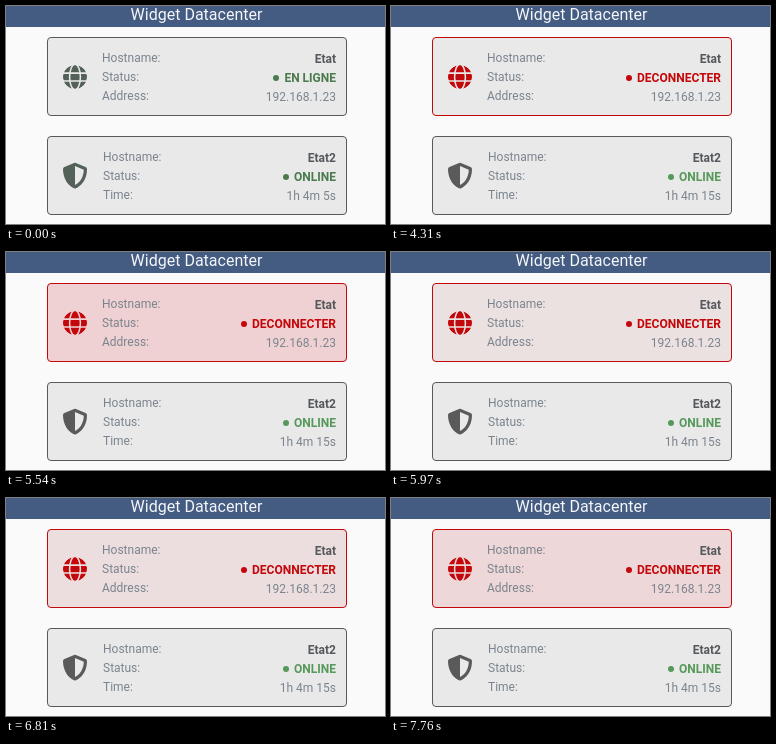
These frames come from a looping animation (379 by 218 pixels, 7.83 s). An HTML page:

```html
<!DOCTYPE html>
<html lang="en">
<head>
<meta charset="utf-8">
<title>Widget Datacenter</title>
<style>
html, body { margin: 0; width: 100%; height: 100%; overflow: hidden; background: #fafafa; }
svg { display: block; width: 379px; height: 218px; font: 12px Roboto, sans-serif; }
.title { font-size: 16px; fill: #f4f6f8; text-anchor: middle; }
.label, .value { fill: #7b848e; }
.right { text-anchor: end; }
.name { fill: #55585c; font-weight: 700; }
.state { font-weight: 700; }
</style>
</head>
<body>
<svg viewBox="0 0 379 218">
  <defs>
    <mask id="grid" maskUnits="userSpaceOnUse" x="-13" y="-13" width="26" height="26">
      <circle r="12" fill="#fff"/>
      <g fill="none" stroke="#000" stroke-width="1.55">
        <ellipse rx="5.4" ry="12.8"/>
        <path d="M-13 -3.9H13M-13 3.9H13"/>
      </g>
    </mask>
  </defs>
  <rect width="379" height="218" fill="#fafafa"/>
  <rect width="379" height="21" fill="#445b82"/>
  <text class="title" x="190.5" y="14">Widget Datacenter</text>

  <g id="server">
    <rect class="box" x="41.5" y="31.5" width="299" height="78" rx="3.5" fill="#e9e9e9"/>
    <g class="icon" transform="translate(69 71)"><circle r="12" mask="url(#grid)"/></g>
    <text class="label" x="96" y="56">Hostname:</text>
    <text class="label" x="96" y="75">Status:</text>
    <text class="label" x="96" y="94">Address:</text>
    <text class="right name" x="330" y="57">Etat</text>
    <circle class="state dot" cy="72" r="3"/>
    <text class="right state word" x="330" y="76"></text>
    <text class="right value" x="330" y="95">192.168.1.23</text>
  </g>

  <g id="uptime">
    <rect class="box" x="41.5" y="130.5" width="299" height="78" rx="3.5" fill="#e9e9e9"/>
    <g class="icon" transform="translate(56.2 156.8) scale(.05)">
      <path d="M466.5 83.7l-192-80a48.15 48.15 0 0 0-36.9 0l-192 80C27.7 91.1 16 108.6 16 128c0 198.5 114.5 335.7 221.5 380.3 11.8 4.9 25.1 4.9 36.9 0C360.1 472.6 496 349.3 496 128c0-19.4-11.7-36.9-29.5-44.3zM256.1 446.3l-.1-381 175.9 73.3c-3.3 151.4-82.1 261.1-175.8 307.7z"/>
    </g>
    <text class="label" x="97" y="155">Hostname:</text>
    <text class="label" x="97" y="174">Status:</text>
    <text class="label" x="97" y="193">Time:</text>
    <text class="right name" x="330" y="156">Etat2</text>
    <circle class="state dot" cx="280" cy="171" r="3"/>
    <text class="right state" x="330" y="175">ONLINE</text>
    <text class="right value" id="clock" x="330" y="194"></text>
  </g>
</svg>
<script>
const LOOP = 7830, TICK = 3350, DOWN = 4310, PULSE = 2040;
const RED = '#c4070b', GREY = '#555b5a';
const server = document.getElementById('server');
const uptime = document.getElementById('uptime');
const clock = document.getElementById('clock');

function set(root, selector, attrs) {
  for (const el of root.querySelectorAll(selector))
    for (const key in attrs) el.setAttribute(key, attrs[key]);
}

function mix(from, to, k) {
  return `rgb(${from.map((v, i) => Math.round(v + (to[i] - v) * k))})`;
}

function draw(t) {
  const down = t >= DOWN;
  const green = t < TICK ? '#4b7a4d' : down ? '#57995a' : '#4ca64f';
  const glow = down ? (1 - Math.cos((t - DOWN) / PULSE * 2 * Math.PI)) / 2 : 0;
  const icon = t < TICK ? '#536158' : '#54595b';

  set(server, '.box', {
    fill: mix([233, 233, 233], [240, 206, 208], glow),
    stroke: down ? RED : GREY
  });
  set(server, '.icon', { fill: down ? RED : icon });
  set(server, '.state', { fill: down ? RED : green });
  set(server, '.dot', { cx: down ? 238 : 270 });
  server.querySelector('.word').textContent = down ? 'DECONNECTER' : 'EN LIGNE';

  set(uptime, '.box', { stroke: GREY });
  set(uptime, '.icon', { fill: down ? '#5a5a5a' : icon });
  set(uptime, '.state', { fill: green });
  clock.textContent = t < TICK ? '1h 4m 5s' : '1h 4m 15s';
}

const start = performance.now();
function frame() {
  draw((performance.now() - start) % LOOP);
  requestAnimationFrame(frame);
}
frame();
</script>
</body>
</html>
```
